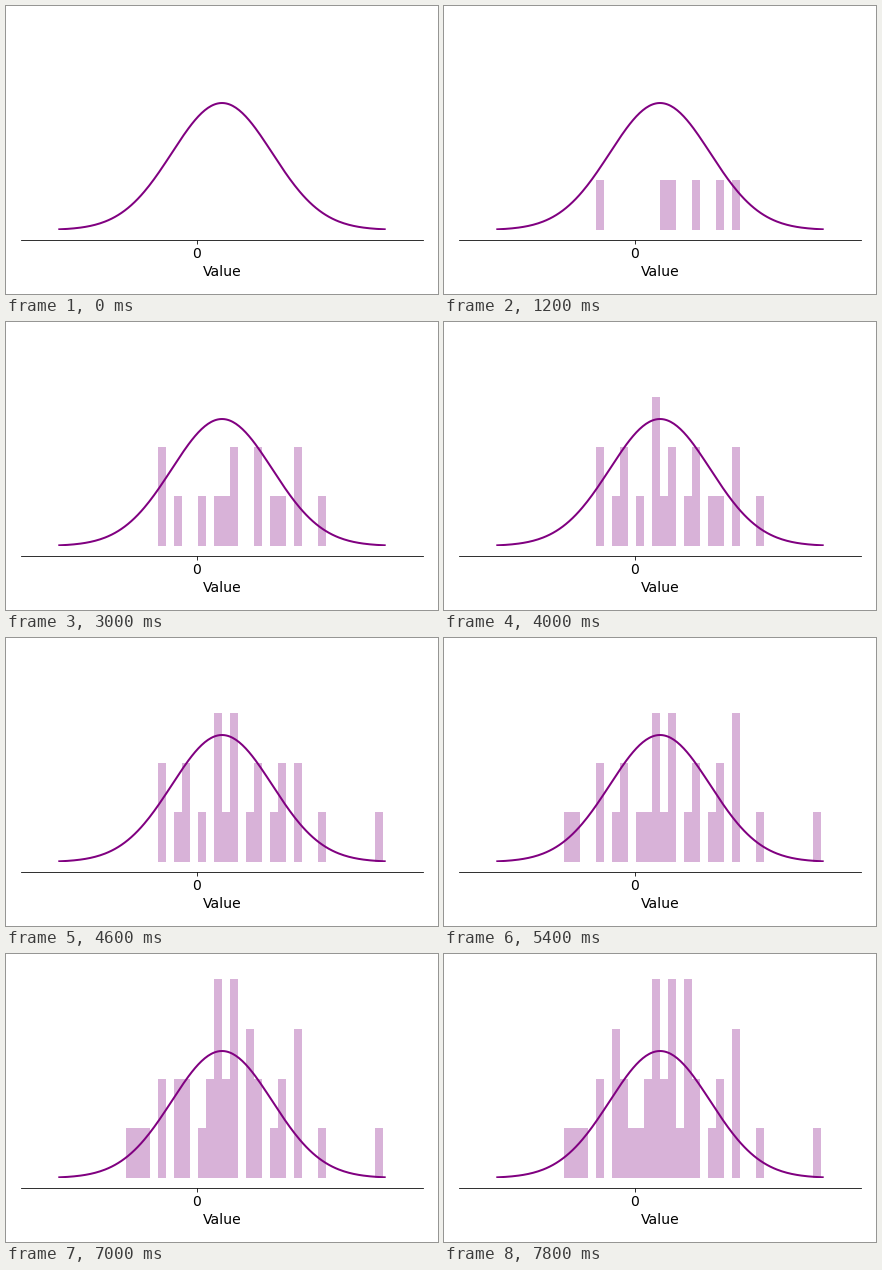
A matplotlib script that plays this animation: 432x288 px, repeating every 8 s.

```python
import numpy as np
import matplotlib.pyplot as plt
from matplotlib.animation import FuncAnimation

W, H, DPI = 432, 288, 72
FRAMES, INTERVAL = 40, 200
MEAN, LOW, HIGH, BINS = 0.5, -3.5, 4.5, 50
STEP = (HIGH - LOW) / BINS

# Histogram bin of each sample, in the order they are drawn
SAMPLES = [25, 29, 17, 32, 26, 34, 37, 24, 19, 34, 31, 22, 26,
           17, 29, 20, 24, 28, 24, 20, 32, 44, 26, 34, 13, 23,
           14, 26, 15, 28, 28, 24, 19, 23, 25, 21, 27, 28, 19]

plt.rcParams.update({"font.family": "DejaVu Sans", "font.size": 14})
fig = plt.figure(figsize=(W / DPI, H / DPI), dpi=DPI, facecolor="white")

pad, base = 15.12, 64
ax = fig.add_axes([pad / W, base / H, 1 - 2 * pad / W, (H - base - pad) / H])
ax.set_xlim(LOW, HIGH)
ax.set_ylim(0, 4.2)
ax.set_xticks([0])
ax.set_yticks([])
ax.set_xlabel("Value")
for side in ("left", "right", "top"):
    ax.spines[side].set_visible(False)
ax.spines["bottom"].set_position(("outward", 10))

# Normal density scaled to expected counts per bin
x = np.linspace(MEAN - 3.24, MEAN + 3.24, 200)
density = np.exp(-(x - MEAN) ** 2 / 2) / np.sqrt(2 * np.pi)
ax.plot(x, density * FRAMES * STEP, color="purple", lw=2)

edges = LOW + STEP * np.arange(BINS)
bars = ax.bar(edges, np.zeros(BINS), width=STEP, align="edge",
              color="purple", alpha=0.3, linewidth=0)


def update(n):
    counts = np.bincount(np.array(SAMPLES[:n], dtype=int), minlength=BINS)
    for bar, count in zip(bars, counts):
        bar.set_height(count)
    return list(bars)


anim = FuncAnimation(fig, update, frames=FRAMES, interval=INTERVAL,
                     init_func=lambda: update(0), repeat=True,
                     repeat_delay=0, blit=False)
plt.show()
```
